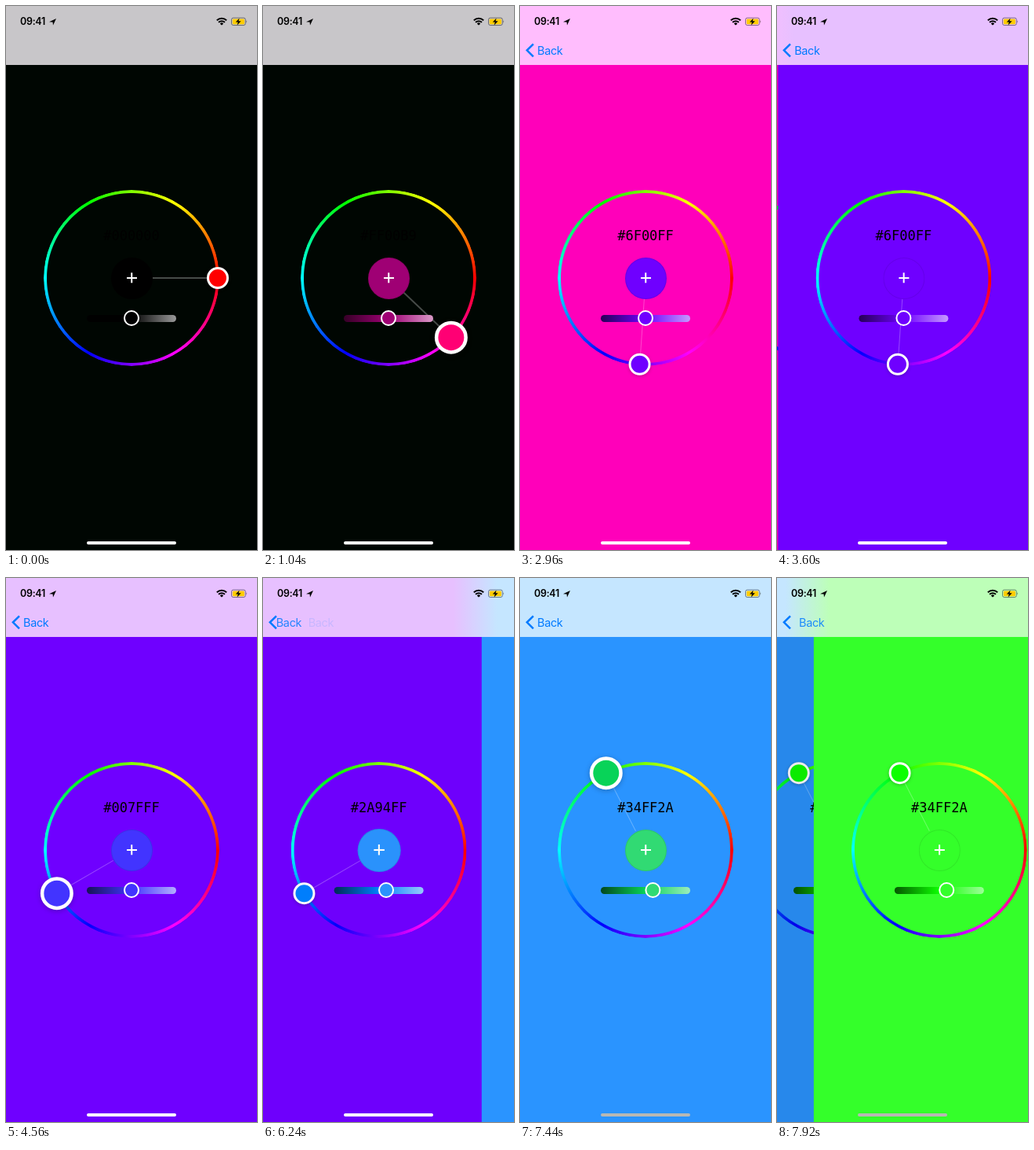
An HTML page for the animation above (8 s loop, 320 by 692 pixels).

```html
<!DOCTYPE html>
<html lang="en">
<head>
<meta charset="utf-8">
<title>Color picker</title>
<style>
html, body { margin: 0; width: 100%; height: 100%; overflow: hidden; background: #000; }
#stage { position: relative; width: 320px; height: 692px; overflow: hidden; }
#stage div, #stage svg { position: absolute; }
#pages, .page { left: 0; top: 0; width: 320px; height: 692px; overflow: hidden; }
.page::after { content: ""; position: absolute; inset: 0; background: #000; opacity: var(--dim); }
.ring {
  left: 48px; top: 234px; width: 224px; height: 224px; border-radius: 50%;
  background: conic-gradient(from 90deg, #f00, #f0f, #00f, #0ff, #0f0, #ff0, #f00);
  -webkit-mask: radial-gradient(closest-side, transparent 107.5px, #000 108.5px);
  mask: radial-gradient(closest-side, transparent 107.5px, #000 108.5px);
}
.label {
  left: 0; width: 320px; top: 280px; text-align: center; color: #000;
  font: 17px/24px "DejaVu Sans Mono", monospace;
}
.line {
  left: 187px; top: 345.3px; width: 70px; height: 1.4px; background: rgba(255,255,255,.28);
  transform-origin: -27px .7px;
}
.disc {
  left: 133.5px; top: 319.5px; width: 53px; height: 53px; border-radius: 50%;
  background: var(--tone); box-shadow: inset 0 0 0 1px rgba(0,0,0,.09);
}
.disc::before, .disc::after {
  content: ""; position: absolute; left: 20px; top: 25.75px; width: 13px; height: 1.5px; background: #fff;
}
.disc::after { transform: rotate(90deg); }
.slider {
  left: 103px; top: 392.5px; width: 114px; height: 9px; border-radius: 5px;
  background: linear-gradient(90deg, var(--dark), var(--base), var(--light));
}
.thumb, .knob { box-sizing: border-box; border: solid #fff; border-radius: 50%; }
.thumb { left: 150px; top: 387px; width: 20px; height: 20px; border-width: 2px; background: var(--tone); }
.knob {
  left: 146px; top: 332px; width: 28px; height: 28px; border-width: 3px;
  background: var(--pure); box-shadow: 0 1px 4px rgba(0,0,0,.25);
}
#bar { left: 0; top: 0; width: 320px; height: 75px; overflow: hidden; }
.back {
  left: 22px; top: 46px; color: #007aff; letter-spacing: -.35px;
  font: 14.5px/21px Inter, Roboto, sans-serif;
}
#time { left: 18px; top: 12px; letter-spacing: -.3px; font: 600 12.5px/16px Inter, Roboto, sans-serif; }
#home { left: 103px; top: 681px; width: 114px; height: 4px; border-radius: 2px; }
</style>
</head>
<body>
<div id="stage">
  <div id="pages"></div>
  <div id="bar">
    <div id="time">09:41</div>
    <svg width="320" height="75" viewBox="0 0 320 75" fill="none">
      <path d="M55 20.2 64 16 60 24.6 59.6 20.6Z" fill="#000"/>
      <g stroke="#000" stroke-width="1.9">
        <path d="M268.8 18.3a9 9 0 0 1 12.4 0M271 20.8a5.8 5.8 0 0 1 8 0"/>
      </g>
      <path d="M275 24.6 272.8 22.4a3.2 3.2 0 0 1 4.4 0Z" fill="#000"/>
      <rect x="287.5" y="15.1" width="17.8" height="9.4" rx="2.3" stroke="#000" stroke-opacity=".45"/>
      <rect x="288.8" y="16.4" width="15.2" height="6.8" rx="1.2" fill="#fc0"/>
      <path d="M306.4 18.2q1.6 1.6 0 3.2Z" fill="#000" fill-opacity=".5"/>
      <path d="M297.6 15.4 292.8 20.4H295.8L294.6 24.4 299.6 19.2H296.5Z" fill="#000"/>
      <path id="chevron" d="M17 48.3 8.9 56.3 17 64.3" stroke="#007aff" stroke-width="2.5"/>
    </svg>
    <div class="back" id="oldBack">Back</div>
    <div class="back" id="newBack">Back</div>
  </div>
  <div id="home"></div>
</div>
<script>
const LOOP = 8000, TINT = 42 / 255;
const HUES = [0, 316.235, 266.118, 210.118, 117.18];

// at: push start; drag: press, end of travel, released and settled
const pages = [
  { at: -9999, bg: '#000602', bar: '#c8c6c9', hue: [360, HUES[1]], drag: [600, 1060, 1290] },
  { at: 1511, bg: '#ff00ba', bar: '#ffbdfd', hue: [HUES[1], HUES[2]], drag: [2040, 2580, 2950] },
  { at: 3270, bg: '#6f00ff', bar: '#e7c0ff', hue: [HUES[2], HUES[3]], drag: [4040, 4520, 5110] },
  { at: 6213, bg: '#2a94ff', bar: '#c5e6ff', hue: [HUES[3], HUES[4]], drag: [6920, 7400, 7720] },
  { at: 7772, bg: '#34ff2a', bar: '#bdffb8', hue: [HUES[4], HUES[4]], drag: [9000, 9100, 9500] }
];

const $ = id => document.getElementById(id);
const clamp = v => Math.max(0, Math.min(1, v));
const ramp = (t, a, b) => { const u = clamp((t - a) / (b - a)); return u * u * (3 - 2 * u); };
const mix = (a, b, k) => a.map((v, i) => v + (b[i] - v) * k);
const rgb = c => `rgb(${c.map(Math.round)})`;
const hex = c => '#' + c.map(v => Math.round(v).toString(16).padStart(2, '0')).join('').toUpperCase();
const BLACK = [0, 0, 0], WHITE = [255, 255, 255];

function hueColor(h) {
  return [0, 240, 120].map(shift => {
    const d = Math.abs((h + shift) % 360 - 180);
    return 255 * clamp(d / 60 - 1);
  });
}

// Share of the push still to travel, critically damped spring
function remaining(t, start) {
  if (t < start) return 1;
  const u = .023 * (t - start);
  return (1 + u) * Math.exp(-u);
}

const parts = ['ring', 'line', 'label', 'slider', 'thumb', 'disc', 'knob'];
for (const page of pages) {
  page.el = document.createElement('div');
  page.el.className = 'page';
  page.el.style.background = page.bg;
  for (const name of parts) {
    page[name] = document.createElement('div');
    page[name].className = name;
    page.el.append(page[name]);
  }
  $('pages').append(page.el);
}

function drawPicker(page, i, t) {
  const [press, stop, settle] = page.drag;
  const [from, to] = page.hue;
  const hue = from + (to - from) * ramp(t, press + 60, stop);
  const fade = ramp(t, press + 90, settle);
  const tint = i < 2 ? 0 : i > 2 ? TINT : TINT * ramp(t, 5560, 5830);

  const pure = mix(hueColor(from), hueColor(to), fade);
  const base = i ? pure : mix(BLACK, hueColor(to), fade);
  const tone = mix(base, WHITE, tint);
  const colors = { pure, base, tone, dark: mix(base, BLACK, .66), light: mix(base, WHITE, .6) };
  for (const key in colors) page.el.style.setProperty('--' + key, rgb(colors[key]));

  const untouched = i === 0 && t < press + 60;
  page.label.textContent = hex(untouched ? BLACK : mix(hueColor(hue), WHITE, tint));

  const angle = -hue * Math.PI / 180;
  const grow = 1 + .5 * (ramp(t, press, press + 160) - ramp(t, settle - 200, settle));
  page.knob.style.transform =
    `translate(${110 * Math.cos(angle)}px, ${110 * Math.sin(angle)}px) scale(${grow})`;
  page.line.style.transform = `rotate(${-hue}deg)`;

  const hold = i === 2 ? ramp(t, 5340, 5440) - ramp(t, 5760, 5920) : 0;
  page.thumb.style.transform = `translateX(${57 * tint}px) scale(${1 + .5 * hold})`;

  const next = pages[i + 1];
  const tap = next ? clamp((t - next.at + 50) / 160) : 0;
  page.disc.style.transform = `scale(${1 + .04 * Math.sin(Math.PI * tap)})`;
}

function draw(t) {
  const top = pages.findLastIndex(page => t >= page.at);
  const rest = remaining(t, pages[top].at), done = 1 - rest;
  const x = 320 * rest;

  pages.forEach((page, i) => {
    const shown = i === top || (i === top - 1 && x > .1);
    page.el.style.visibility = shown ? 'visible' : 'hidden';
    if (!shown) return;
    const isTop = i === top;
    page.el.style.transform = `translateX(${isTop ? x : -96 * done}px)`;
    page.el.style.setProperty('--dim', isTop ? 0 : .09 * done);
    drawPicker(page, i, t);
  });

  const under = pages[Math.max(0, top - 1)].bar;
  $('bar').style.background = x > .5
    ? `linear-gradient(90deg, ${under} ${x - 36}px, ${pages[top].bar} ${x + 20}px)`
    : pages[top].bar;

  $('newBack').style.opacity = top ? done : 0;
  $('newBack').style.transform = `translateX(${.128 * x}px)`;
  $('oldBack').style.opacity = top > 1 ? clamp(1 - 1.2 * done) : 0;
  $('oldBack').style.transform = `translateX(${-41 * done}px)`;
  $('chevron').style.opacity = top > 1 ? 1 : top ? done : 0;
  $('home').style.background = rgb(mix(WHITE, [184, 184, 180], ramp(t, 6400, 6700)));
}

let start;
function tick(now) {
  start ??= now;
  draw((now - start) % LOOP);
  requestAnimationFrame(tick);
}
draw(0);
requestAnimationFrame(tick);
</script>
</body>
</html>
```
